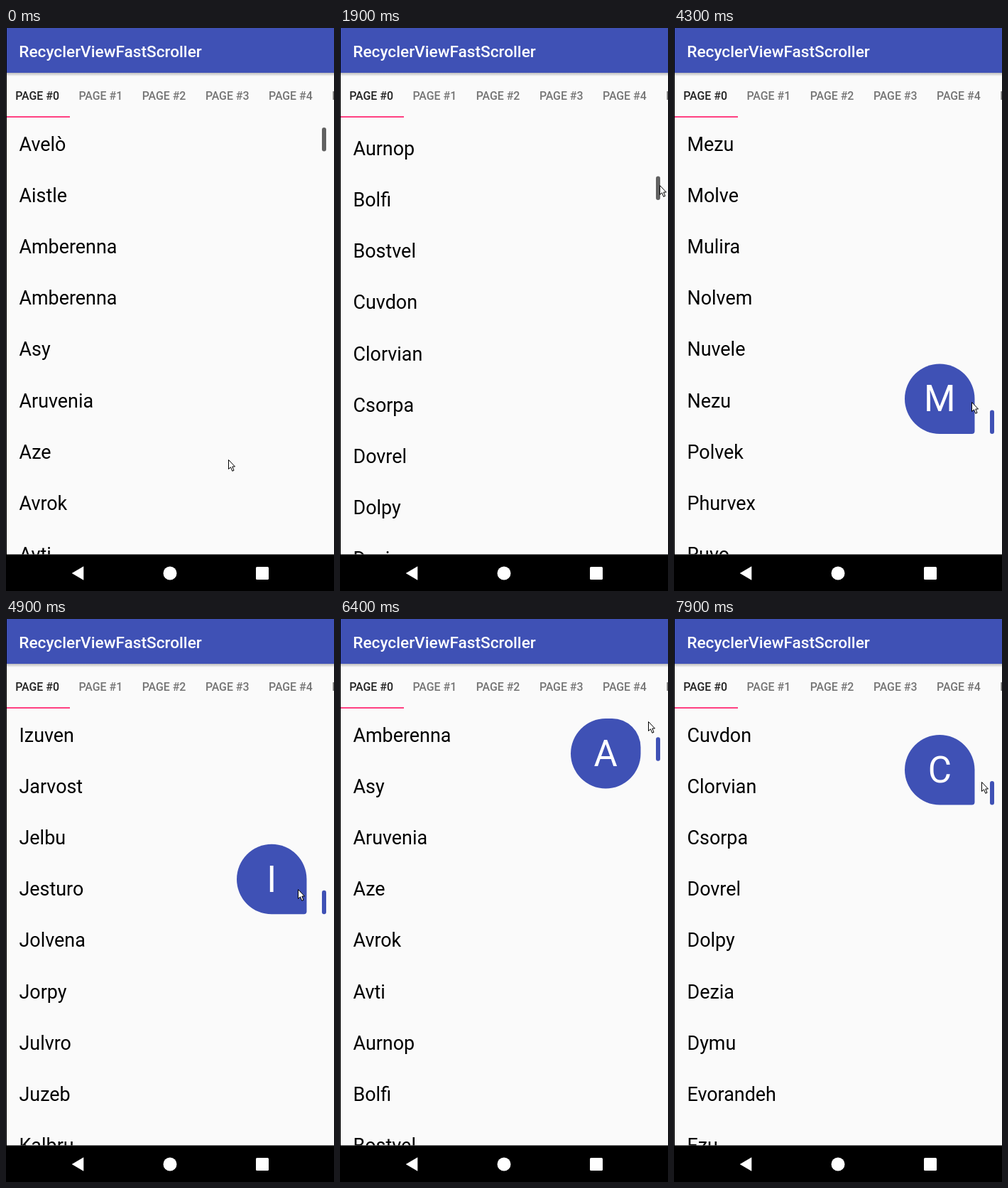
Write an HTML page with a canvas that moves like this. It is 462x792 px and loops after 8000 ms.

```html
<!DOCTYPE html>
<html lang="en">
<head>
<meta charset="utf-8">
<title>RecyclerViewFastScroller</title>
<style>
  html, body { margin: 0; width: 100%; height: 100%; overflow: hidden; background: #fafafa; }
  canvas { display: block; }
</style>
</head>
<body>
<canvas id="stage" width="462" height="792"></canvas>
<script>
const ctx = document.getElementById('stage').getContext('2d');
const BLUE = '#3f51b5';
const LOOP = 8000, STEP = 100, GRAB_TIME = 2200;
const ROW = 72.2, MAX_SCROLL = 5188;
const LIST_TOP = 126, LIST_BOTTOM = 740.5;
const TRACK_TOP = 140, TRACK = 553, THUMB = 33.5;
const BUBBLE_LEFT = 325, BUBBLE = 98.5;
const CURSOR_LEAD = 80; // the view follows the pointer with this delay

const names = `Avelò Aistle Amberenna Amberenna Asy Aruvenia Aze Avrok Avti Aurnop
Bolfi Bostvel Cuvdon Clorvian Csorpa Dovrel Dolpy Dezia Dymu Evorandeh
Ezu Felbu Fulm Fostorval Gavrul Gelbo Gorsina Gulvey Hasbo Helvru
Hostin Hurvel Ilvru Irsoba Izuven Jarvost Jelbu Jesturo Jolvena Jorpy
Julvro Juzeb Kalbru Kestovi Kolvru Kurpa Kyvo Lasbru Lelvona Lestuv
Lorpi Luzbe Lyvro Malbro Marvust Mastuvi Melbru Mezu Molve Mulira
Nolvem Nuvele Nezu Polvek Phurvex Ruvo Rusba Sorvengo Selbu Skelvo
Solbry Stuvena Tasbo Telvru Torpuni Valbru Vostel Welbro Yusbo Zelvru`.split(/\s+/);

const clamp = v => Math.min(1, Math.max(0, v));
const linear = p => p;
const easeIn = p => p * p;
const easeOut = p => Math.sin(p * Math.PI / 2);

const rest = { thumb: 0, x: 313, y: 607 };
const gestures = [
  { start: 480, end: 1350, ease: linear, thumb: 56, x: 330, y: 110 },
  { start: 1350, end: 1900, ease: easeOut, thumb: 68.6, x: 450, y: 221 },
  { start: 2880, end: 3700, ease: easeOut, thumb: TRACK, x: 428, y: 690 },
  { start: 3700, end: 5420, ease: linear, thumb: 107, x: 405, y: 274 },
  { start: 5800, end: 6900, ease: easeOut, thumb: 0, x: 440, y: 117 },
  { start: 7000, end: 7900, ease: easeIn, thumb: 88, x: 433, y: 229 },
];

function valueAt(key, t) {
  return gestures.reduce((value, g) => {
    const p = g.ease(clamp((t - g.start) / (g.end - g.start)));
    return value + (g[key] - value) * p;
  }, rest[key]);
}

function rect(color, x, y, w, h, radius = 0) {
  ctx.fillStyle = color;
  ctx.beginPath();
  ctx.roundRect(x, y, w, h, radius);
  ctx.fill();
}

function text(str, x, y, size, color, weight = 400, align = 'left') {
  ctx.font = `${weight} ${size}px Roboto, sans-serif`;
  ctx.textAlign = align;
  ctx.fillStyle = color;
  ctx.fillText(str, x, y);
}

function drawList(scroll) {
  ctx.save();
  ctx.beginPath();
  ctx.rect(0, LIST_TOP, 462, LIST_BOTTOM - LIST_TOP);
  ctx.clip();
  const first = Math.floor(scroll / ROW);
  for (let i = first; i < Math.min(first + 10, names.length); i++)
    text(names[i], 18.5, 172.5 + i * ROW - scroll, 26.9, '#000');
  ctx.restore();
}

function drawHeader() {
  rect(BLUE, 0, 0, 462, 63);
  const shadow = ctx.createLinearGradient(0, 63, 0, 68);
  shadow.addColorStop(0, 'rgba(0,0,0,.25)');
  shadow.addColorStop(1, 'rgba(0,0,0,0)');
  rect(shadow, 0, 63, 462, 5);
  text('RecyclerViewFastScroller', 18.3, 40.8, 22.65, '#fff', 500);
  for (let i = 0; i < 6; i++)
    text('PAGE #' + i, 13.3 + i * 89.2, 101, 15.9, i ? '#757575' : '#212121', 500);
  rect('#ff4081', 1, 124, 89, 2);
}

function drawNavBar() {
  rect('#000', 0, LIST_BOTTOM, 462, 52);
  ctx.fillStyle = '#fff';
  ctx.fill(new Path2D('M92.7 767 L109.3 757.2 V776.8 Z'));
  rect('#fff', 221.5, 757.5, 19, 19, 9.5);
  rect('#fff', 352, 758, 18, 18, 1.5);
}

function drawBubble(offset, letter, alpha) {
  const top = Math.max(TRACK_TOP, TRACK_TOP + offset + THUMB - BUBBLE);
  const round = BUBBLE / 2;
  // Near the top the pointed corner moves from the lower to the upper right.
  const p = offset / (BUBBLE - THUMB);
  const corner = q => 4 + (round - 4) * clamp(q);
  ctx.globalAlpha = alpha;
  rect(BLUE, BUBBLE_LEFT, top, BUBBLE, BUBBLE, [round, corner(2 * p), corner(2 - 2 * p), round]);
  text(letter, BUBBLE_LEFT + round, top + 67, 51, '#fff', 400, 'center');
  ctx.globalAlpha = 1;
}

const arrow = new Path2D('M.5 .5 V13.5 L3.5 10.8 L5.8 16.3 L8 15.3 L5.8 10 H9.5 Z');
function drawCursor(x, y) {
  ctx.save();
  ctx.translate(Math.round(x), Math.round(y));
  ctx.fillStyle = '#fff';
  ctx.strokeStyle = '#000';
  ctx.fill(arrow);
  ctx.stroke(arrow);
  ctx.restore();
}

function draw(t) {
  const active = clamp((t - GRAB_TIME) / 200);
  const offset = valueAt('thumb', t);
  const index = Math.min(names.length - 1, Math.floor(offset / TRACK * names.length));
  // Grabbing the thumb snaps the list to whole rows.
  const scroll = active ? Math.min(index * ROW, MAX_SCROLL) : offset / TRACK * MAX_SCROLL;

  rect('#fafafa', 0, 0, 462, 792);
  drawList(scroll);
  drawHeader();
  rect(active ? BLUE : '#616161', 445, TRACK_TOP + offset, 6, THUMB, 3);
  if (active) drawBubble(offset, names[index][0], active);
  drawNavBar();
  rect('#000', 0, 0, 1, 792);
  drawCursor(valueAt('x', t + CURSOR_LEAD), valueAt('y', t + CURSOR_LEAD));
}

function frame() {
  const t = performance.now() % LOOP;
  draw(Math.floor(t / STEP) * STEP);
  requestAnimationFrame(frame);
}
frame();
</script>
</body>
</html>
```
